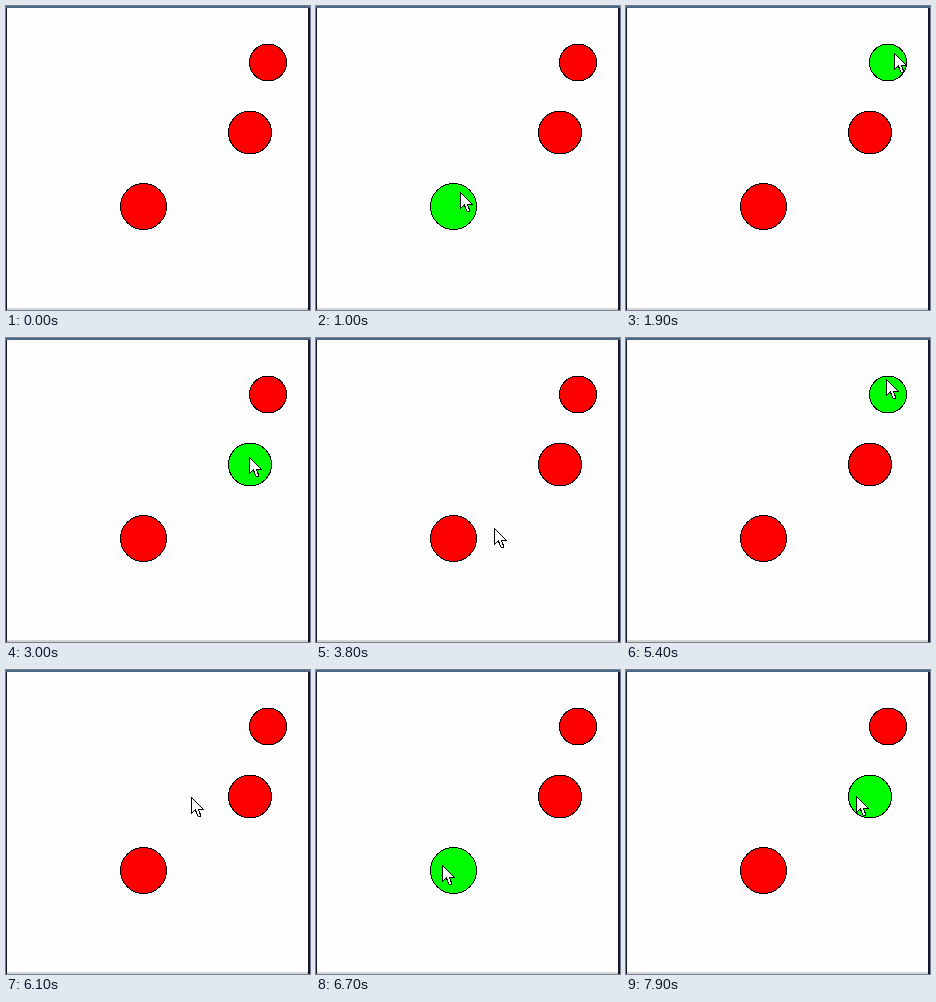
An HTML page that plays this animation: 304x304 px, repeating every 8 s.

```html
<!DOCTYPE html>
<html lang="en">
<head>
<meta charset="utf-8">
<title>Hover circles</title>
<style>
  html, body { margin: 0; width: 100%; height: 100%; overflow: hidden; background: #fefefe; }
  svg { display: block; width: 100vw; height: 100vh; shape-rendering: crispEdges; }
  circle { fill: #f00; stroke: #000; stroke-width: 1; }
  circle.hover { fill: #0f0; }
</style>
</head>
<body>
<svg viewBox="0 0 304 304">
  <rect width="304" height="304" fill="#fefefe"/>
  <rect y="302" width="304" height="2" fill="#d4d4d4"/>
  <rect width="1" height="304" fill="#14142c"/>
  <rect x="302" width="2" height="304" fill="#14142c"/>
  <rect width="304" height="2" fill="#4a6884"/>
  <circle cx="262" cy="56.5" r="18.5"/>
  <circle cx="244" cy="126.5" r="21.5"/>
  <circle cx="137.5" cy="200.5" r="23"/>
  <path id="cursor" d="M.5 .5V16.5L4.3 12.8L7 19H9.5V17.5L7.2 12.3H12Z"
        fill="#fff" stroke="#000"/>
</svg>
<script>
  const LOOP = 8000, STEP = 100;
  const circles = [...document.querySelectorAll('circle')];
  const cursor = document.getElementById('cursor');

  // Turning points of the pointer: time and tip position
  const turns = [
    { t: 0, x: 140, y: 310 },
    { t: 900, x: 140, y: 202 },
    { t: 1900, x: 268, y: 47 },
    { t: 3000, x: 243, y: 119 },
    { t: 3800, x: 178, y: 190 },
    { t: 4300, x: 142, y: 204 },
    { t: 5400, x: 260, y: 41 },
    { t: 6700, x: 126, y: 195 },
    { t: 7900, x: 230, y: 126 }
  ];

  // Slope at a turning point; zero where the pointer reverses
  function slope(i, axis) {
    const a = turns[i - 1], p = turns[i], b = turns[i + 1];
    if (!a || !b || (p[axis] - a[axis]) * (b[axis] - p[axis]) <= 0) return 0;
    return (b[axis] - a[axis]) / (b.t - a.t);
  }

  // Cubic Hermite curve through the turning points
  function tipAt(t, axis) {
    const next = turns.findIndex(p => p.t > t);
    const j = next < 0 ? turns.length - 1 : next, i = j - 1;
    const a = turns[i], b = turns[j], span = b.t - a.t;
    const u = Math.min(1, (t - a.t) / span), v = 1 - u;
    return Math.round(
      v * v * (1 + 2 * u) * a[axis] + u * u * (1 + 2 * v) * b[axis] +
      u * v * span * (v * slope(i, axis) - u * slope(j, axis)));
  }

  function draw() {
    const t = Math.floor(performance.now() % LOOP / STEP) * STEP;
    const x = tipAt(t, 'x'), y = tipAt(t, 'y');
    cursor.setAttribute('transform', `translate(${x} ${y})`);
    for (const c of circles) {
      const dx = x - c.cx.baseVal.value, dy = y - c.cy.baseVal.value;
      c.classList.toggle('hover', Math.hypot(dx, dy) <= c.r.baseVal.value);
    }
    requestAnimationFrame(draw);
  }
  draw();
</script>
</body>
</html>
```
